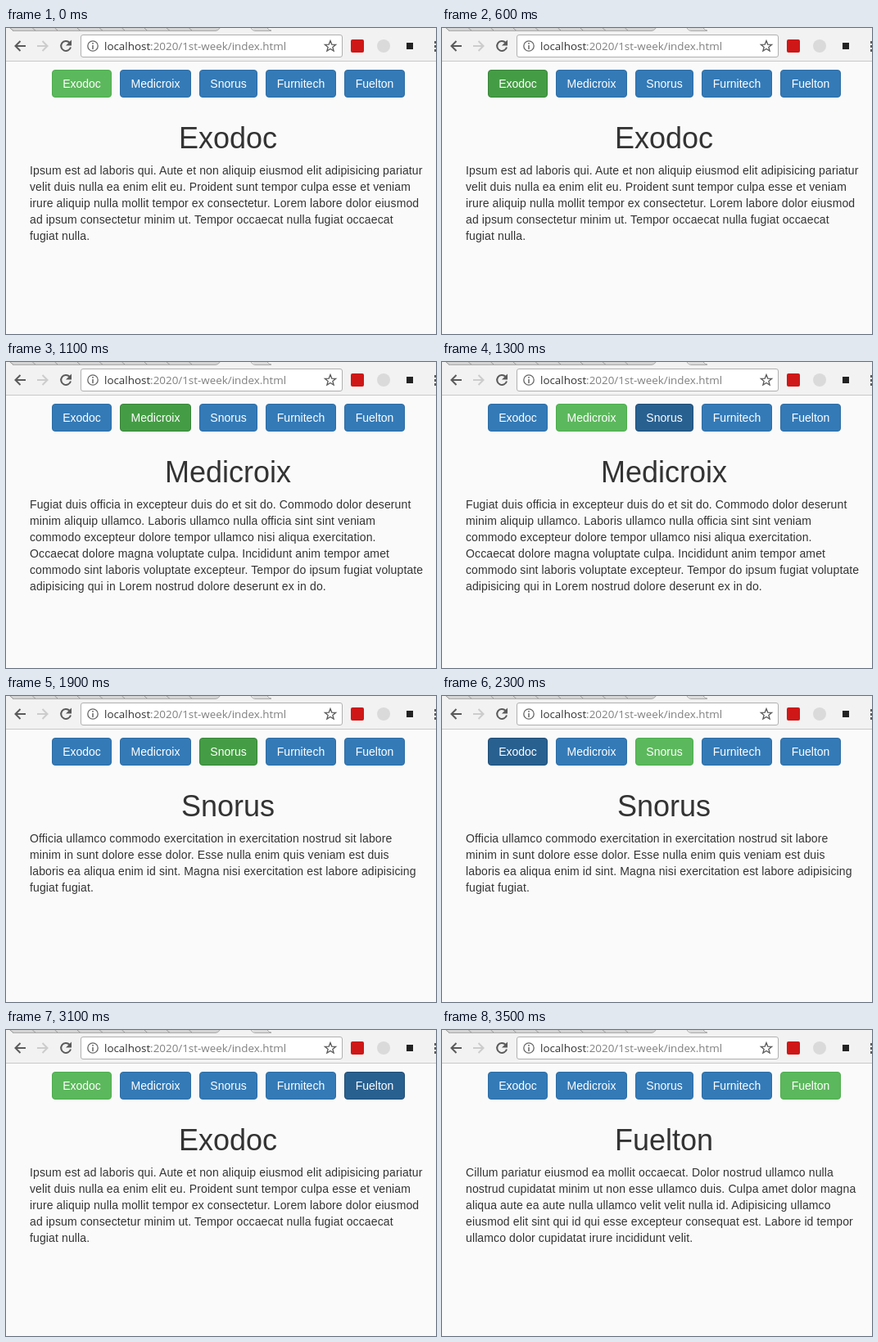
Recreate the animation shown at these times as an HTML page. Size 525 by 374 pixels, loop 4000 ms.

```html
<!DOCTYPE html>
<html lang="en">
<head>
<meta charset="utf-8">
<title>Tabs</title>
<style>
  html, body { margin: 0; width: 100%; height: 100%; overflow: hidden; }
  body { position: relative; background: #fafafa; color: #333; font: 14px/20px "Liberation Sans", Arial, sans-serif; }
  svg { position: absolute; left: 0; top: 0; }
  .btn { position: absolute; top: 51px; height: 34px; box-sizing: border-box; padding: 6px 0; border: 1px solid; border-radius: 4px; color: #fff; text-align: center; white-space: nowrap; }
  h1 { position: absolute; left: 29px; top: 115px; width: 484px; margin: 0; font-size: 36px; line-height: 39.6px; font-weight: 400; text-align: center; }
  p { position: absolute; left: 29px; top: 164px; margin: 0; white-space: pre; letter-spacing: 0.12px; }
</style>
</head>
<body>
<svg width="525" height="41" fill="none">
  <path fill="#f2f2f2" d="M0 0h525v41H0z"/>
  <path fill="#d4d4d4" d="M4 0h258l-4 3H8z"/>
  <path fill="#dcdcdc" d="M300 0h19l4 3h-19z"/>
  <path id="tabs" stroke="#999"/>
  <path stroke="#aaa" d="M8 3.500h248q3 0 5-3.500M299 0q2 3.500 5 3.500h20M319 0q2 3 5 3"/>
  <path stroke="#c8c8c8" d="M0 40.500h525"/>
  <g stroke-width="2">
    <path stroke="#5a5a5a" d="M24 22H12M17.500 16L11.500 22l6 6"/>
    <path stroke="#ccc" d="M38 22h12M44.500 16l6 6l-6 6"/>
    <path stroke="#5a5a5a" d="M77.500 17.700A6 6 0 1 0 79 23.500"/>
  </g>
  <path fill="#5a5a5a" d="M80 14.500v7h-7z"/>
  <rect x="91.500" y="8.500" width="319" height="27" rx="2.500" fill="#fff" stroke="#b0b0b0"/>
  <circle cx="106" cy="22" r="6.200" stroke="#666" stroke-width="1.300"/>
  <path stroke="#666" stroke-width="1.500" d="M106 18v1.700M106 21v5"/>
  <text x="120" y="27" font-family="Open Sans, Noto Sans, sans-serif" font-size="13.400" fill="#333">localhost<tspan fill="#808080">:2020/1st-week/index.html</tspan></text>
  <path id="star" stroke="#5a5a5a" stroke-width="1.300"/>
  <rect x="421" y="14" width="16" height="16" rx="2" fill="#cf1717"/>
  <circle cx="461" cy="22" r="8" fill="#dadada"/>
  <rect x="489" y="18" width="8" height="8" fill="#222"/>
  <path fill="#5a5a5a" d="M523 16h2v3h-2zM523 21h2v3h-2zM523 26h2v3h-2z"/>
</svg>
<h1></h1>
<p></p>
<script>
const find = selector => document.querySelector(selector);

const names = ['Exodoc', 'Medicroix', 'Snorus', 'Furnitech', 'Fuelton'];
const spans = [[56, 73], [139, 87], [236, 71], [317, 86], [413, 74]];
const copy = {
  0: `Ipsum est ad laboris qui. Aute et non aliquip eiusmod elit adipisicing pariatur
velit duis nulla ea enim elit eu. Proident sunt tempor culpa esse et veniam
irure aliquip nulla mollit tempor ex consectetur. Lorem labore dolor eiusmod
ad ipsum consectetur minim ut. Tempor occaecat nulla fugiat occaecat
fugiat nulla.`,
  1: `Fugiat duis officia in excepteur duis do et sit do. Commodo dolor deserunt
minim aliquip ullamco. Laboris ullamco nulla officia sint sint veniam
commodo excepteur dolore tempor ullamco nisi aliqua exercitation.
Occaecat dolore magna voluptate culpa. Incididunt anim tempor amet
commodo sint laboris voluptate excepteur. Tempor do ipsum fugiat voluptate
adipisicing qui in Lorem nostrud dolore deserunt ex in do.`,
  2: `Officia ullamco commodo exercitation in exercitation nostrud sit labore
minim in sunt dolore esse dolor. Esse nulla enim quis veniam est duis
laboris ea aliqua enim id sint. Magna nisi exercitation est labore adipisicing
fugiat fugiat.`,
  4: `Cillum pariatur eiusmod ea mollit occaecat. Dolor nostrud ullamco nulla
nostrud cupidatat minim ut non esse ullamco duis. Culpa amet dolor magna
aliqua aute ea aute nulla ullamco velit velit nulla id. Adipisicing ullamco
eiusmod elit sint qui id qui esse excepteur consequat est. Labore id tempor
ullamco dolor cupidatat irure incididunt velit.`
};

// [fill, border] for idle, hovered and pressed buttons
const blue = [['#337ab7', '#2e6da4'], ['#286090', '#204d74'], ['#204d74', '#122b40']];
const green = [['#5cb85c', '#4cae4c'], ['#449d44', '#398439']];

// [start in ms, open page, button under the pointer, pressed]
const steps = [
  [0, 0, -1], [600, 0, 0], [800, 0, 1], [1000, 0, 1, true],
  [1100, 1, 1], [1200, 1, -1], [1300, 1, 2],
  [1900, 2, 2], [2100, 2, 1], [2300, 2, 0],
  [2600, 0, 0], [2700, 0, -1], [2900, 0, 3], [3100, 0, 4],
  [3300, 4, 4], [3500, 4, -1]
];

const buttons = names.map((name, i) => {
  const el = document.createElement('div');
  el.className = 'btn';
  el.textContent = name;
  el.style.left = spans[i][0] + 'px';
  el.style.width = spans[i][1] + 'px';
  return document.body.appendChild(el);
});

find('#tabs').setAttribute('d',
  Array.from({ length: 9 }, (_, i) => `M${5 + i * 27.3} 0l4 3.5`).join(''));
find('#star').setAttribute('d', 'M' + Array.from({ length: 10 }, (_, i) => {
  const r = i % 2 ? 3 : 7, a = (i / 5 - 0.5) * Math.PI;
  return `${396 + r * Math.cos(a)} ${22.5 + r * Math.sin(a)}`;
}).join('L') + 'Z');

let shown;
function show(step) {
  const [, page, hover, pressed] = shown = step;
  find('h1').textContent = names[page];
  find('p').textContent = copy[page];
  buttons.forEach((el, i) => {
    const state = i !== hover ? 0 : pressed ? 2 : 1;
    [el.style.backgroundColor, el.style.borderColor] = (i === page ? green : blue)[state];
  });
}

const start = performance.now();
function frame() {
  const t = (performance.now() - start) % 4000;
  const step = steps.findLast(s => s[0] <= t);
  if (step !== shown) show(step);
  requestAnimationFrame(frame);
}
frame();
</script>
</body>
</html>
```
